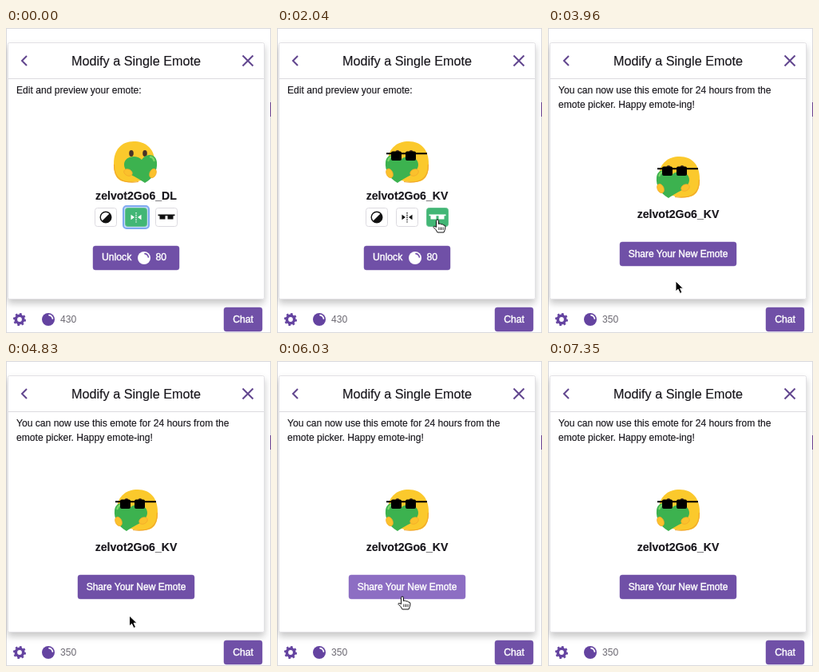
An HTML page for the animation above (7380 ms loop, 332 by 382 pixels).

```html
<!DOCTYPE html>
<html lang="en">
<head>
<meta charset="utf-8">
<title>Modify a Single Emote</title>
<style>
  html, body { margin: 0; width: 100%; height: 100%; overflow: hidden; background: #fff; }
  svg { display: block; width: 332px; height: 382px; font: 12.1px "Liberation Sans", Arial, sans-serif; }
  text { fill: #18161c; stroke: #18161c; stroke-width: .15; }
  .mid { text-anchor: middle; }
  .name { font-size: 14.1px; font-weight: bold; text-anchor: middle; }
  .label { fill: #fff; stroke: #fff; stroke-width: .4; font-size: 12.2px; }
  .btn { fill: #7050a7; stroke: #7050a7; stroke-opacity: .45; }
  .btn.hover { fill: #8d6ec3; stroke: #8d6ec3; }
  .glow { filter: drop-shadow(0 0 2px #9a74dc); }
  .tool rect { fill: #fff; stroke: #dcdae0; }
  .tool { color: #111; }
  .tool.on { color: #fff; }
  .tool.on rect { fill: #42b675; stroke: #63c28e; }
  .line { fill: none; stroke: #62468f; stroke-width: 2; }
</style>
</head>
<body>
<svg viewBox="0 0 332 382">
  <defs>
    <filter id="shadow" x="-10%" y="-10%" width="120%" height="120%">
      <feDropShadow dx="0" dy="5" stdDeviation="4.5" flood-color="#000" flood-opacity=".22"/>
    </filter>
    <g id="orb">
      <circle r="8" fill="currentColor"/>
      <path d="M1 -5.4A5.5 5.5 0 0 1 5.4 -1" fill="none" stroke="var(--shine)" stroke-width="1.7" stroke-linecap="round"/>
    </g>
  </defs>

  <rect width="332" height="382" fill="#fff"/>
  <path d="M0 .5H332M.5 0V382M0 381.5H332M331.5 0V382" stroke="#d9d8dc"/>
  <rect x="331" y="93" width="1" height="18" fill="#6b3f90"/>

  <rect x="2.5" y="18.5" width="321" height="321" rx="2" fill="#fff" stroke="#e2e1e5" filter="url(#shadow)"/>
  <path d="M3 63.5H323" stroke="#dcdbdf"/>
  <path class="line" d="M26 35L20 41L26 47M296.5 34.5L309.5 47.5M309.5 34.5L296.5 47.5"/>
  <text class="mid" x="163" y="47" font-size="16.2">Modify a Single Emote</text>

  <g fill="none" stroke="#6443a0">
    <circle cx="17" cy="365" r="4.7" stroke-width="3.6"/>
    <circle cx="17" cy="365" r="7" stroke-width="2" pathLength="16" stroke-dasharray="1"/>
  </g>
  <use href="#orb" x="53" y="365" style="color:#6443a0;--shine:#fff"/>
  <text id="balance" x="68" y="369" style="fill:#6c6972;stroke:none"></text>
  <rect class="btn" x="273" y="350" width="48" height="30" rx="3"/>
  <text class="label mid" x="297" y="369">Chat</text>

  <g id="emote">
    <path fill="#fbc92c" d="M4 23C5 8 16 0 30 0C46 0 55 11 55 28C55 44 50 51 36 51C18 51 3 44 4 23Z"/>
    <path fill="none" stroke="#f2a82b" stroke-width="1.2" d="M24 50.500C44 53 55 47 54.500 29"/>
    <g fill="#493328">
      <ellipse cx="16" cy="15" rx="2.8" ry="4"/>
      <ellipse cx="33" cy="15" rx="2.8" ry="4"/>
    </g>
    <path fill="#3cb24f" d="M16 52C5 46 0 36 1 26C2 15 15 14 20 23C26 16 42 18 42 29C42 40 27 44 16 52Z"/>
    <path fill="none" stroke="#7bd668" stroke-width="2.4" stroke-linecap="round" d="M4.5 24Q5.5 20 9 19.5"/>
    <g fill="#fbc12c" stroke="#f2a82b" stroke-width=".7">
      <ellipse cx="6" cy="40" rx="4" ry="6" transform="rotate(-25 6 40)"/>
      <ellipse cx="37" cy="39" rx="5.5" ry="4" transform="rotate(-25 37 39)"/>
    </g>
    <path id="shades" d="M2 14.3H8Q8 12.500 10 12.500H19Q21 12.500 21 14.300H26Q26 12.500 28 12.500H37Q39 12.500 39 14.300H53V16.200H39V22Q39 24 37 24H28Q26 24 26 22V16.200H21V22Q21 24 19 24H10Q8 24 8 22V16.200H2Z"/>
  </g>

  <g id="editor">
    <text x="13" y="82">Edit and preview your emote:</text>
    <text class="name" id="editName" x="163" y="215"></text>
    <g class="tool" transform="translate(125 237)">
      <rect x="-13.5" y="-11.5" width="27" height="23" rx="3"/>
      <circle r="6.8" fill="none" stroke="currentColor" stroke-width="1.4"/>
      <path d="M4.8 -4.8A6.8 6.8 0 0 1 -4.8 4.8Z" fill="currentColor"/>
    </g>
    <rect id="ring" x="147" y="223" width="32" height="28" rx="4" fill="#c5d9fb" stroke="#7fa9ef" stroke-width="2"/>
    <g class="tool" id="flipTool" transform="translate(163 237)">
      <rect x="-13.5" y="-11.5" width="27" height="23" rx="3"/>
      <path d="M-6.5 -3.2L-2 0L-6.5 3.2ZM6.5 -3.2L2 0L6.5 3.2Z" fill="currentColor"/>
      <path d="M0 -6V6.5" stroke="currentColor" stroke-width="1.3" stroke-dasharray="1.6 1.2"/>
    </g>
    <g class="tool" id="shadesTool" transform="translate(201 237)">
      <rect x="-13.5" y="-11.5" width="27" height="23" rx="3"/>
      <path d="M-10.500 -3.500H10.500V-1.800H8.500V2.500H1.500V-1.800H-1.500V2.500H-8.500V-1.800H-10.500Z" fill="currentColor"/>
    </g>
    <rect class="btn" id="unlock" x="109" y="273" width="108" height="30" rx="3"/>
    <text class="label" x="120" y="291">Unlock</text>
    <use href="#orb" x="173" y="288" style="color:#fff;--shine:#7653ae"/>
    <text class="label" x="187.5" y="291">80</text>
  </g>

  <g id="done">
    <text x="13" y="82">You can now use this emote for 24 hours from the</text>
    <text x="13" y="100">emote picker. Happy emote-ing!</text>
    <text class="name" x="163" y="238">zelvot2Go6_KV</text>
    <rect class="btn" id="share" x="90" y="268" width="146" height="30" rx="3"/>
    <text class="label mid" x="163" y="287" style="font-size:12px">Share Your New Emote</text>
  </g>

  <g id="cursor" stroke-linejoin="round">
    <path id="arrow" d="M0 0V13L3 10.2L5.5 15.5L8 14.3L5.6 9.2H9.5Z" stroke="#fff"/>
    <path id="hand" fill="#fff" stroke="#111" d="M-1.5 1.5Q-1.5 0 0 0T1.5 1.5V5.5Q4 4 4.5 6Q7 5 7.5 7Q10 6.5 10 9Q10 12 8 16H0Q-2 12 -5 9.5Q-5 7 -1.5 9.5ZM2 9.5V13M4.5 9.5V13M7 9.5V13"/>
  </g>
</svg>
<script>
const $ = id => document.getElementById(id);
const LOOP = 7380, PICK_SHADES = 1800, UNLOCK_FOCUS = 2820, UNLOCKED = 3030;

// Pointer tip: time, x, y
const path = [
  [0, 190, 400], [250, 190, 390], [600, 188, 320], [750, 188, 320], [1260, 194, 250],
  [1560, 201, 240], [2310, 201, 240], [2760, 178.5, 282], [3150, 178.5, 282], [3700, 160, 317],
  [4400, 160, 317], [4800, 154.5, 319], [5300, 154.5, 319], [5850, 157, 295], [6180, 157, 295],
  [6750, 162, 400], [LOOP, 190, 400]
];

function pointer(t) {
  const i = path.findIndex(p => p[0] > t);
  const [t0, x0, y0] = path[i - 1], [t1, x1, y1] = path[i];
  const u = (t - t0) / (t1 - t0), k = u * u * (3 - 2 * u);
  return [x0 + (x1 - x0) * k, y0 + (y1 - y0) * k];
}

const show = (id, on) => $(id).style.display = on ? '' : 'none';
const inside = (x, y, l, t, w, h) => x >= l && x < l + w && y >= t && y < t + h;

function draw(now) {
  const t = now % LOOP;
  const shaded = t >= PICK_SHADES, done = t >= UNLOCKED;
  const [x, y] = pointer(t);
  const onUnlock = !done && inside(x, y, 109, 273, 108, 30);
  const onShare = done && inside(x, y, 90, 268, 146, 30);
  const onTool = !done && inside(x, y, 187, 225, 28, 24);
  const hand = onUnlock || onShare || onTool;

  show('editor', !done);
  show('done', done);
  show('ring', !shaded);
  show('shades', shaded);
  show('hand', hand);
  show('arrow', !hand);
  $('flipTool').classList.toggle('on', !shaded);
  $('shadesTool').classList.toggle('on', shaded);
  $('unlock').classList.toggle('hover', onUnlock);
  $('unlock').classList.toggle('glow', t >= UNLOCK_FOCUS);
  $('share').classList.toggle('hover', onShare);
  $('editName').textContent = shaded ? 'zelvot2Go6_KV' : 'zelvot2Go6_DL';
  $('balance').textContent = done ? 350 : 430;
  $('emote').setAttribute('transform', shaded
    ? `translate(135 ${done ? 161 : 142})`
    : 'translate(190 142) scale(-1 1)');
  $('cursor').setAttribute('transform', `translate(${x} ${y})`);
}

const start = performance.now();
function tick() {
  draw(performance.now() - start);
  requestAnimationFrame(tick);
}
tick();
</script>
</body>
</html>
```
